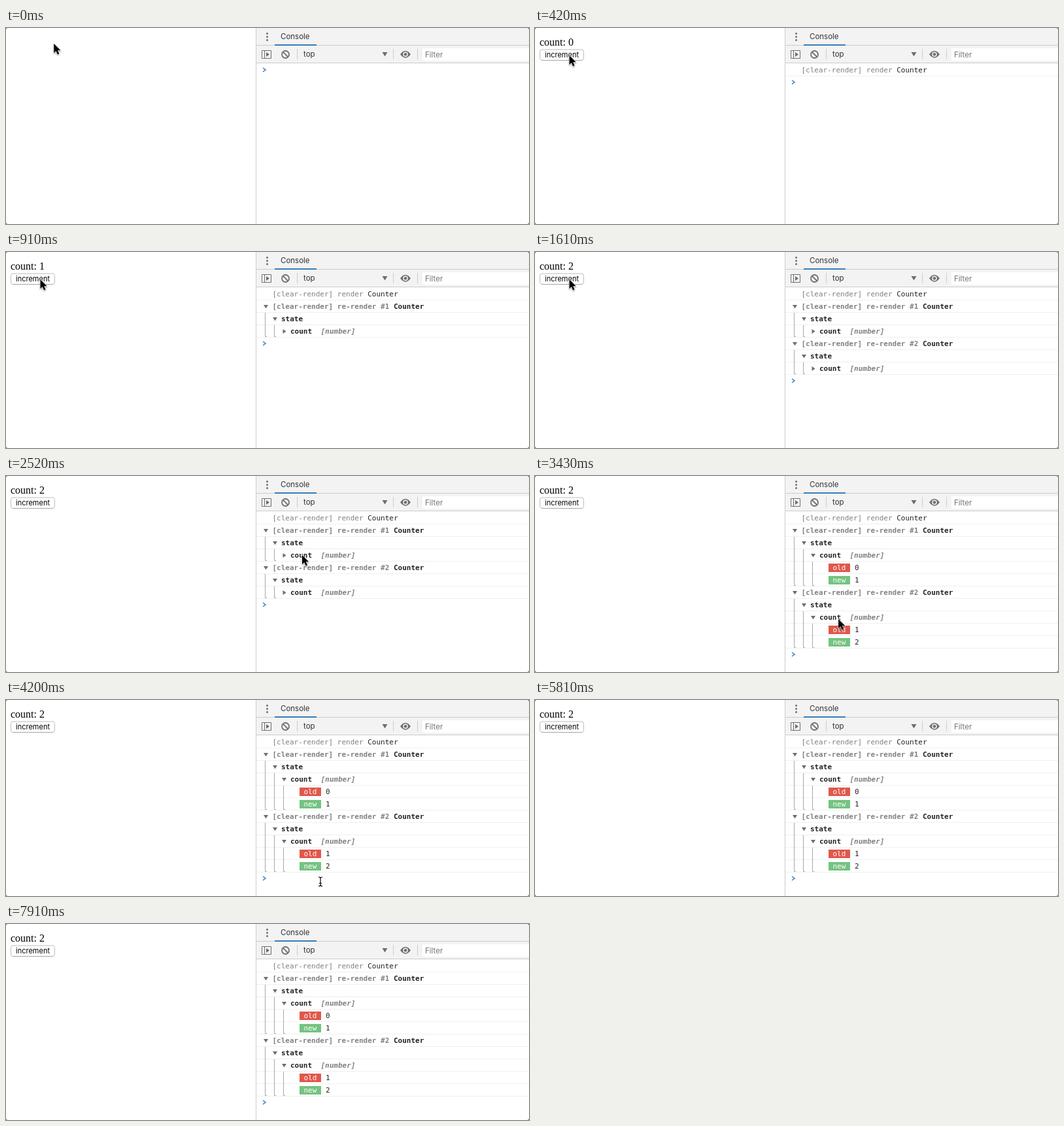
These frames come from a looping animation (800 px wide and 300 px high, 8000 ms). An HTML page:

```html
<!DOCTYPE html>
<html>
<head>
<meta charset="utf-8">
<style>
  html, body { margin: 0; height: 100%; overflow: hidden; background: #fff; }
  svg { display: block; width: 800px; height: 300px; }
  text { white-space: pre; }
  .ui { font: 11.5px Inter, sans-serif; fill: #333; }
  .page { font: 16px "Liberation Serif", serif; fill: #000; }
  .btn { font: 11px Inter, sans-serif; fill: #000; }
  .log { font: 11px "DejaVu Sans Mono", monospace; fill: #222; }
  .bold { font-weight: bold; }
  .dim { fill: #808080; }
  .type { fill: #808080; font-style: italic; }
  .icon { fill: #6e6e6e; }
  .line { fill: none; stroke: #6e6e6e; }
</style>
</head>
<body>
<svg viewBox="0 0 800 300">
  <defs>
    <linearGradient id="press" x2="0" y2="1">
      <stop stop-color="#6cb3fa"/><stop offset="1" stop-color="#1a7bf5"/>
    </linearGradient>
  </defs>
  <rect width="800" height="300" fill="#fff"/>

  <g id="page">
    <text id="count" class="page" x="7" y="27"></text>
    <rect id="button" x="7.5" y="33" width="67" height="16.5" rx="3.5" stroke="#bcbcbc"/>
    <path id="edge" d="M10 49.5H72" stroke="#a6a6a6"/>
    <text id="label" class="btn" x="41" y="45" text-anchor="middle">increment</text>
  </g>

  <rect x="383" width="417" height="53" fill="#f3f3f3"/>
  <path d="M382.5 0V300M383 26.5H800M383 53.5H800M445.5 32V48M592.5 32V48M629.5 32V48" stroke="#ccc"/>
  <rect x="411" y="25" width="64" height="2" fill="#3b7cba"/>
  <g class="icon">
    <circle cx="399.5" cy="8.5" r="1.5"/><circle cx="399.5" cy="13.5" r="1.5"/><circle cx="399.5" cy="18.5" r="1.5"/>
    <path d="M398 37V44L403 40.5ZM575.5 37H583.5L579.5 43.5Z"/>
    <path d="M603 40.3Q611 29.5 619 40.3Q611 51 603 40.3Z"/>
  </g>
  <path class="line" d="M391.5 34.5H405.5V46.5H391.5ZM395.5 34.5V46.5"/>
  <g class="line" stroke-width="1.8"><circle cx="427.5" cy="40.5" r="5.5"/><path d="M423.6 36.6L431.4 44.4"/></g>
  <circle cx="611" cy="40.3" r="3.1" fill="#6e6e6e" stroke="#f3f3f3" stroke-width="1.5"/>
  <rect x="637" y="31" width="163" height="19" fill="#fff"/>
  <text class="ui" x="420" y="17">Console</text>
  <text class="ui" x="455" y="44">top</text>
  <text class="ui" x="641" y="45" style="fill:#757575">Filter</text>

  <g id="log"></g>

  <path id="arrow" d="M0 0V14.2L3.2 11.2L5.6 16.6L8.1 15.5L5.8 10.3H10.2Z" stroke="#fff" stroke-width="1.2"
    paint-order="stroke" style="filter:drop-shadow(0 1px 1px #0006)"/>
  <g id="beam" fill="none">
    <path d="M-3 -7Q0 -7 0 -5Q0 -7 3 -7M0 -5V5M-3 7Q0 7 0 5Q0 7 3 7M-2 2.5H2" stroke="#fff" stroke-width="2.6"/>
    <path d="M-3 -7Q0 -7 0 -5Q0 -7 3 -7M0 -5V5M-3 7Q0 7 0 5Q0 7 3 7M-2 2.5H2" stroke="#000" stroke-width="1.2"/>
  </g>
  <path d="M0 0H3Q0 0 0 3ZM800 0V3Q800 0 797 0ZM0 300V297Q0 300 3 300ZM800 300H797Q800 300 800 297Z" fill="#555"/>
</svg>
<script>
const LOOP = 8000, STEP = 70, ROW = 19;
const LOADED = 70, CLICKS = [700, 1470], HOLD = 140, OPENED = [2660, 3290];
// Pointer stops: time, x, y
const PATH = [[70, 73.3, 24], [420, 52.5, 42], [2100, 52.5, 42], [2520, 453, 121], [2660, 453, 121],
  [2940, 460.5, 207], [3290, 461, 208], [3850, 481, 278], [4200, 481, 278], [4480, 481, 312]];
const $ = id => document.getElementById(id);

function pointer(t) {
  const i = PATH.findIndex(p => p[0] > t);
  if (i < 0) return PATH[PATH.length - 1].slice(1);
  if (i === 0) return PATH[0].slice(1);
  const [t0, x0, y0] = PATH[i - 1], [t1, x1, y1] = PATH[i];
  let k = (t - t0) / (t1 - t0);
  k = k * k * (3 - 2 * k);
  return [x0 + (x1 - x0) * k, y0 + (y1 - y0) * k];
}

const text = (x, y, s, cls = '') => `<text class="log ${cls}" x="${x}" y="${y + 4}">${s}</text>`;
const dim = s => `<tspan class="dim">${s}</tspan>`;
const toggle = (x, y, open) => `<path class="icon" d="${open
  ? `M${x} ${y - 2}h7l-3.5 5.5Z` : `M${x + 1.5} ${y - 3}v7l5 -3.5Z`}"/>`;
const guide = (x, top, end) => `<path d="M${x + .5} ${top}V${end}h2.5" fill="none" stroke="#a8a8a8"/>`;
const badge = (y, s, color, value) => `<rect x="449" y="${y - 6}" width="33" height="13" fill="${color}"/>`
  + text(455.5, y, s, 'badge" style="fill:#fff') + text(489, y, value);

function drawLog(count, opened) {
  let y = 64, out = '';
  const next = () => {
    out += `<path d="M383 ${y + 9.5}H800" stroke="#f0f0f0"/>`;
    y += ROW;
  };
  if (count >= 0) {
    out += text(407.5, y, dim('[clear-render] render ') + 'Counter');
    next();
  }
  for (let n = 1; n <= count; n++) {
    const top = y + 10, open = opened >= n;
    out += toggle(394, y, true) + text(407.5, y, dim(`[clear-render] re-render #${n} `) + 'Counter', 'bold');
    next();
    out += toggle(408, y, true) + text(421, y, 'state', 'bold');
    next();
    out += toggle(422, y, open) + text(435, y, 'count', 'bold') + text(481.5, y, '[number]', 'bold type');
    next();
    if (open) {
      out += badge(y, 'old', '#e0584c', n - 1);
      next();
      out += badge(y, 'new', '#75c382', n);
      next();
    }
    const end = y - 10.5;
    out += guide(396, top, end) + guide(410, top + ROW, end);
    if (open) out += guide(424, top + 2 * ROW, end);
  }
  out += `<path d="M393 ${y - 3}l4 3l-4 3" fill="none" stroke="#4478b8" stroke-width="1.5"/>`;
  $('log').innerHTML = out;
}

let last = '';
function render(t) {
  const count = t < LOADED ? -1 : CLICKS.filter(c => t >= c + HOLD).length;
  const opened = OPENED.filter(o => t >= o).length;
  const pressed = CLICKS.some(c => t >= c && t < c + HOLD);
  const state = [count, opened].join();
  if (state !== last) {
    drawLog(count, opened);
    last = state;
  }
  $('page').style.display = count < 0 ? 'none' : '';
  $('count').textContent = 'count: ' + count;
  $('button').setAttribute('fill', pressed ? 'url(#press)' : '#fff');
  $('label').style.fill = pressed ? '#fff' : '#000';

  const [x, y] = pointer(t), typing = y > 262;
  $('arrow').style.display = typing ? 'none' : '';
  $('beam').style.display = typing ? '' : 'none';
  $(typing ? 'beam' : 'arrow').setAttribute('transform', `translate(${x} ${y})`);
}

const start = performance.now();
function frame() {
  const t = (performance.now() - start) % LOOP;
  render(Math.floor(t / STEP) * STEP);
  requestAnimationFrame(frame);
}
frame();
</script>
</body>
</html>
```
